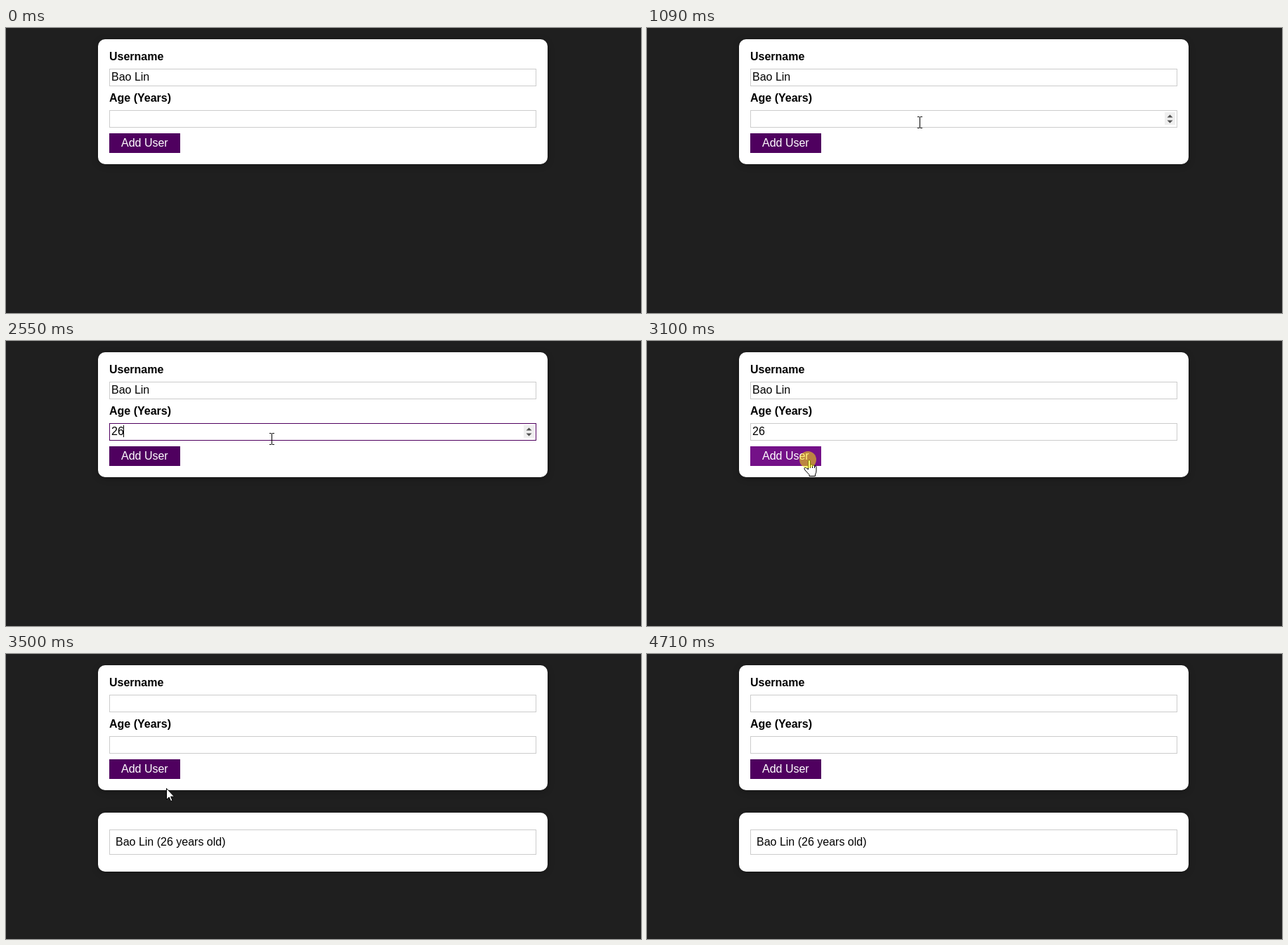
An HTML page for the animation above (5.3 s loop, 904 px wide and 406 px high).

```html
<!DOCTYPE html>
<html lang="en">
<head>
<meta charset="utf-8">
<title>Add user form</title>
<style>
  html, body { margin: 0; width: 100%; height: 100%; overflow: hidden; background: #1f1f1f; }
  svg { display: block; width: 904px; height: 406px; }
  text { font: 16px "Liberation Sans", Arial, sans-serif; }
  .label { font-weight: bold; }
  .card { fill: #fff; filter: drop-shadow(0 2px 4px rgba(0, 0, 0, .26)); }
  .box { fill: #fff; stroke: #ccc; }
  .pointer { fill: #fff; stroke: #000; stroke-linejoin: round; }
</style>
</head>
<body>
<svg viewBox="0 0 904 406">
  <rect width="904" height="406" fill="#1f1f1f"/>
  <rect class="card" x="131" y="16" width="640" height="178" rx="10"/>
  <text class="label" x="147" y="46">Username</text>
  <rect class="box" x="147.5" y="58.5" width="607" height="24"/>
  <text id="name" x="150" y="75">Bao Lin</text>
  <text class="label" x="147" y="105">Age (Years)</text>
  <rect class="box" id="ageBox" x="147.5" y="117.5" width="607" height="24"/>
  <text id="age" x="150" y="134"></text>
  <rect id="caret" y="120" width="1" height="17"/>
  <g id="spinner">
    <rect x="737" y="120" width="15" height="18" fill="#efefef"/>
    <path d="M740.5 127.5h8l-4-4zM740.5 131.5h8l-4 4z" fill="#505050"/>
  </g>
  <rect id="button" x="147" y="150" width="101" height="28"/>
  <text x="164" y="169" fill="#fff">Add User</text>
  <g id="list">
    <rect class="card" x="131" y="226" width="640" height="84" rx="10"/>
    <rect class="box" x="147.5" y="250.5" width="607" height="35"/>
    <text x="156" y="273">Bao Lin (26 years old)</text>
  </g>
  <g id="cursor">
    <path id="arrow" class="pointer" d="M.5 .5V16.5L4.2 13 6.7 18.7 9 17.7 6.6 12.2H11.6Z"/>
    <path id="beam" d="M-3 -7.5H0M1 -7.5H4M.5 -7V8M-3 8.5H0M1 8.5H4" fill="none" stroke="#000"/>
    <g id="hand">
      <path class="pointer" d="M.5 14V2Q.5 .5 2 .5T3.5 2V8Q3.5 6.8 5 6.8T6.5 8.3V9Q6.5 7.8 8 7.8T9.5 9.3V10.5Q9.5 9 10.8 9T12 10.8V16Q12 19 10.5 21V23.5H2V21.5L-4 15Q-6 12.5-4.5 11.5T.5 14Z"/>
      <path d="M3.5 8V12M6.5 9V12M9.5 10V12" stroke="#000"/>
    </g>
  </g>
  <circle id="click" r="12" fill="#fff000" fill-opacity=".52"/>
</svg>
<script>
const LOOP = 5300, TICK = 69;
const ENTER = 470, FOCUS = 1160, TYPE_2 = 1690, TYPE_6 = 2550, PRESS = 3100, SEND = 3160, LEAVE = 4710;
const BLINK = 530, DIGIT = 8.9;
const $ = id => document.getElementById(id);
const show = (id, on) => $(id).setAttribute('display', on ? 'inline' : 'none');
const within = (t, a, b) => t >= a && t < b;

// The pointer rests between strokes; each stroke is one cubic curve.
const strokes = [
  { from: ENTER, to: 1090, curve: [[600, 343], [430, 120], [390, 64], [388, 134]] },
  { from: TYPE_6, to: 3030, curve: [[378, 139], [320, 160], [250, 176], [229, 169]] },
  { from: 3370, to: 3980, curve: [[229, 169], [226, 268], [218, 45], [218, 115]] },
  { from: 3980, to: 4610, curve: [[218, 115], [320, -20], [760, 150], [798, 387]] }
];

const cubic = (a, b, c, d, u) => {
  const v = 1 - u;
  return v * v * v * a + 3 * v * v * u * b + 3 * v * u * u * c + u * u * u * d;
};

function pointerAt(t) {
  if (!within(t, ENTER, LEAVE)) return null;
  const { from, to, curve } = strokes.filter(s => s.from <= t).pop();
  const steps = Math.round((to - from) / TICK);
  const progress = Math.min(1, (t - from) / (to - from));
  const u = Math.floor(progress * steps + 1e-6) / steps;
  return [0, 1].map(axis => Math.round(cubic(...curve.map(p => p[axis]), u)));
}

function render(t) {
  const pos = pointerAt(t);
  const over = (top, bottom, right = 755) =>
    !!pos && within(pos[0], 147, right) && within(pos[1], top, bottom);
  const onButton = over(150, 178, 248);
  const onAge = over(117, 142);
  const onField = onAge || over(58, 83);
  const focused = within(t, FOCUS, PRESS);
  const sent = t >= SEND;
  const age = t < TYPE_2 || sent ? '' : t < TYPE_6 ? '2' : '26';
  const lastKey = t < TYPE_2 ? FOCUS : t < TYPE_6 ? TYPE_2 : TYPE_6;

  show('name', !sent);
  show('list', sent);
  $('age').textContent = age;
  $('ageBox').style.stroke = focused ? '#4f005f' : '#ccc';
  $('caret').setAttribute('x', Math.floor(150 + age.length * DIGIT));
  show('caret', focused && t - lastKey < BLINK);
  show('spinner', focused || onAge || over(91, 109));
  $('button').setAttribute('fill', onButton ? '#741188' : '#4f005f');

  show('cursor', pos);
  show('arrow', !onButton && !onField);
  show('beam', onField);
  show('hand', onButton);
  show('click', within(t, FOCUS, FOCUS + TICK) || within(t, PRESS, SEND));
  if (pos) {
    for (const id of ['cursor', 'click']) $(id).setAttribute('transform', `translate(${pos})`);
  }
}

const start = performance.now();
function tick() {
  render((performance.now() - start) % LOOP);
  requestAnimationFrame(tick);
}
tick();
</script>
</body>
</html>
```
